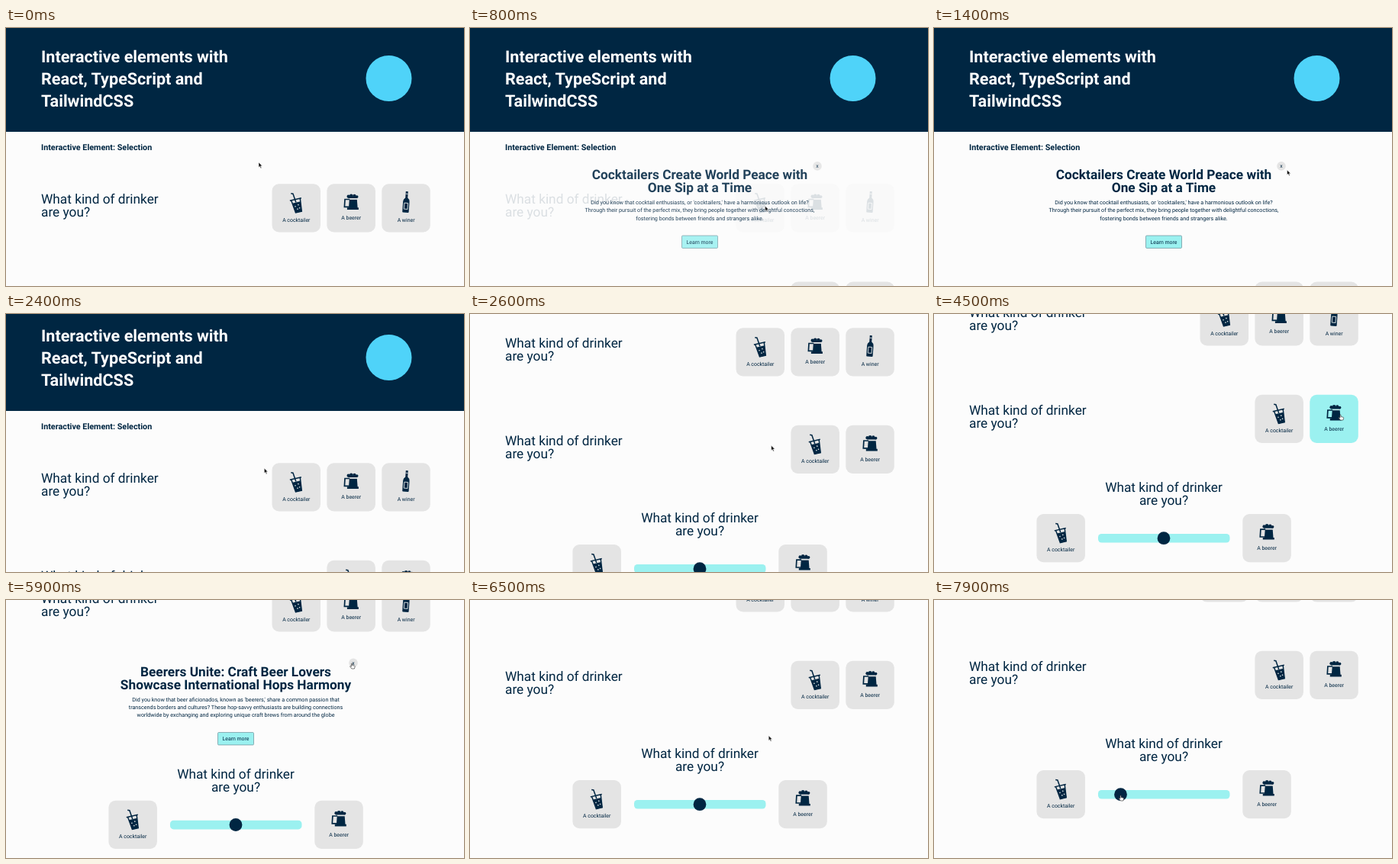
Animation, 600 px wide and 338 px high, one loop 8 s. Source, as an HTML page:

```html
<!DOCTYPE html>
<html lang="en">
<head>
<meta charset="utf-8">
<style>
  html, body { margin: 0; height: 100%; overflow: hidden; background: #fcfcfc; }
  svg { display: block; width: 100vw; height: 100vh; font-family: Roboto, sans-serif; fill: #002642; }
  text { text-rendering: geometricPrecision; }
  .title { font-weight: bold; font-size: 21.6px; fill: #fff; }
  .section { font-weight: bold; font-size: 10.8px; }
  .question { font-size: 17.28px; }
  .headline { font-weight: bold; font-size: 17.28px; }
  .copy { font-size: 7.2px; }
  .label { font-size: 6.92px; }
  .mid { text-anchor: middle; }
  .card { fill: #e4e4e4; }
  .aqua { fill: #9bf1f0; }
  .line { fill: none; stroke: #002642; }
</style>
</head>
<body>
<svg id="stage" viewBox="0 0 600 338"></svg>
<script>
const LOOP = 8000, PITCH = 127.5, ROW_TOP = 204.3;

// Text block: one <text> per line
const lines = (cls, x, y, step, ...rows) =>
  rows.map((s, i) => `<text class="${cls}" x="${x}" y="${y + i * step}">${s}</text>`).join('');

const icons = {
  cocktailer: `<g transform="rotate(-13 32 25)">
      <path class="line" stroke-width="1.5" d="M24.3 20H39.7M26.2 20.5 28.2 37H36.2L38 20.5M27.8 11.2 30.3 12.2 31.6 24"/>
      <path d="M26.7 24.3H37.6L36.3 37.3H28.2Z"/>
      ${[[29.6, 29], [33.8, 27.8], [31.6, 33], [34.6, 32.2]]
        .map(([x, y]) => `<circle cx="${x}" cy="${y}" r=".8" fill="#e4e4e4"/>`).join('')}
    </g>`,
  beerer: `<path class="line" stroke-width="1.7" d="M30 20.2H23.6L23 30H28.8"/>
    <path d="M29.4 20.4H39.4L40.2 31H41.5V33.6H26.5V31H28.6Z"/>
    <circle cx="28.2" cy="16.4" r="2.1"/><circle cx="31.8" cy="15.3" r="2.2"/>
    <circle cx="36" cy="15.6" r="2.2"/><circle cx="39.2" cy="16.8" r="1.9"/>
    <path d="M28 16H39.5V18.7H28Z"/>
    <path fill="none" stroke="#e4e4e4" stroke-width=".8" d="M29.8 19.6H39.5"/>`,
  winer: `<g transform="rotate(4 32 24)">
    <path d="M30.5 9.7H33.5V18.2Q36.2 20 36.2 23V36.5Q36.2 37.5 35.2 37.5H28.8Q27.8 37.5 27.8 36.5V23Q27.8 20 30.5 18.2Z"/>
    <path fill="none" stroke="#e4e4e4" stroke-width=".9" d="M29.6 25H34.4V33H29.6ZM30.4 13H33.6"/></g>`
};
const labelY = { cocktailer: 49.3, beerer: 47, winer: 49.8 };

const card = (kind, x, y) => `<g transform="translate(${x} ${y})">
  <rect class="card" data-x="${x}" data-y="${y}" width="63.5" height="63.2" rx="9"/>
  ${icons[kind]}${lines('label mid', 31.8, labelY[kind], 0, 'A ' + kind)}</g>`;

const question = (cls, x, y) => lines('question ' + cls, x, y, 17.3, 'What kind of drinker', 'are you?');

const row = (id, y, kinds) => `<g id="${id}">${question('', 46, y + 25.8)}${
  kinds.map((k, i) => card(k, 492.3 - 71.9 * (kinds.length - 1 - i), y)).join('')}</g>`;

const panel = (id, y, head, copy) => `<g id="${id}" transform="translate(0 ${y})">
  <circle class="card" cx="455" cy="-23.4" r="5.8"/>${lines('label mid', 455, -21.3, 0, 'x')}
  ${lines('headline mid', 301, -6.3, 17.3, ...head)}
  ${lines('copy mid', 301, 27.1, 10.1, ...copy)}
  <rect class="aqua" x="277.5" y="67.7" width="47" height="16.4" rx="1.2" stroke="#6b8f99" stroke-width=".7"/>
  ${lines('label mid', 301, 78.4, 0, 'Learn more')}</g>`;

const cocktailHead = ['Cocktailers Create World Peace with', 'One Sip at a Time'];
const cocktailCopy = [
  "Did you know that cocktail enthusiasts, or 'cocktailers,' have a harmonious outlook on life?",
  'Through their pursuit of the perfect mix, they bring people together with delightful concoctions,',
  'fostering bonds between friends and strangers alike.'];
const beerHead = ['Beerers Unite: Craft Beer Lovers', 'Showcase International Hops Harmony'];
const beerCopy = [
  "Did you know that beer aficionados, known as 'beerers,' share a common passion that",
  'transcends borders and cultures? These hop-savvy enthusiasts are building connections',
  'worldwide by exchanging and exploring unique craft brews from around the globe'];

const $ = id => document.getElementById(id);
$('stage').innerHTML = `<g id="page">
  <rect width="600" height="136"/>
  ${lines('title', 46, 45, 29, 'Interactive elements with', 'React, TypeScript and', 'TailwindCSS')}
  <circle cx="501.5" cy="66" r="30" fill="#4fd3f9"/>
  ${lines('section', 46, 160.4, 0, 'Interactive Element: Selection')}
  ${row('row1', ROW_TOP, ['cocktailer', 'beerer', 'winer'])}
  ${panel('panel1', ROW_TOP, cocktailHead, cocktailCopy)}
  <g id="second">
    ${row('row2', ROW_TOP + PITCH, ['cocktailer', 'beerer'])}
    ${panel('panel2', ROW_TOP + PITCH, cocktailHead, cocktailCopy)}
    ${panel('panel3', ROW_TOP + PITCH, beerHead, beerCopy)}
  </g>
  <g id="slider">
    ${question('mid', 301, 459)}
    ${card('cocktailer', 134.4, 488)}${card('beerer', 404.3, 488)}
    <rect class="aqua" x="215" y="514" width="172.5" height="11.6" rx="4.5"/>
    <circle id="knob" cy="519.7" r="8.4"/>
  </g></g>
  <g id="cursor">
    <path id="arrow" fill="#111" stroke="#fff" stroke-width=".4" transform="scale(1.25)" d="M0 0V5.2L1.2 4.1 2.1 6.1 3 5.7 2.1 3.8H3.8Z"/>
    <path id="hand" fill="#fff" stroke="#222" stroke-width=".6" d="M-.6 .4Q0-.4 .6 .4V2.6L3.6 3.2Q4.3 3.5 4.1 4.6L3.4 7H-.2L-2.3 4.2Q-2.4 3.3-1.5 3.6L-.6 4.3Z"/>
  </g>`;

const ramp = (t, start, length) => Math.min(1, Math.max(0, (t - start) / length));
const smooth = u => u * u * (3 - 2 * u);
const cubic = u => u < .5 ? 4 * u ** 3 : 1 - 4 * (1 - u) ** 3;
const during = (t, from, to) => ramp(t, from, 220) - ramp(t, to, 220);

// Pointer stops: time, x, y
const path = [
  [0, 331, 176], [60, 331, 176], [500, 382, 236], [700, 382, 236], [1400, 462.5, 186],
  [1520, 455, 181], [1700, 455, 181], [2350, 338.3, 202], [2420, 338.3, 202], [2780, 450, 143],
  [2900, 450, 143], [3200, 445.3, 149.5], [3500, 454, 83], [3700, 454, 83], [4300, 532.5, 132],
  [4900, 532.5, 132], [5700, 453, 83], [6050, 453, 83], [6400, 400, 170],
  [6950, 301, 256], [7100, 301, 256], [7750, 244.5, 256], [8000, 244.5, 256]];

function pointer(t) {
  const i = path.findIndex(p => p[0] > t), [a, x0, y0] = path[i - 1], [b, x1, y1] = path[i];
  const u = smooth((t - a) / (b - a));
  return [x0 + (x1 - x0) * u, y0 + (y1 - y0) * u];
}

function show(id, opacity) { $(id).setAttribute('opacity', opacity); }
function move(id, x, y) { $(id).setAttribute('transform', `translate(${x} ${y})`); }

function draw(t) {
  const scroll = Math.round(226 * cubic(ramp(t, 2300, 465)) + 39 * cubic(ramp(t, 6250, 450)));
  const open1 = during(t, 610, 1600), open2 = during(t, 2900, 3600), open3 = during(t, 4700, 5930);
  const [x, y] = pointer(t);
  const knobX = 301 - 56.5 * smooth(ramp(t, 7100, 650));

  show('panel1', open1);
  show('panel2', open2);
  show('panel3', open3);
  show('row1', 1 - open1);
  show('row2', (1 - open2 - open3) * ramp(t, 60, 300));
  move('second', 0, .8 * open1);
  move('slider', 0, .8 * (open2 + open3));
  move('page', 0, -scroll);
  $('knob').setAttribute('cx', knobX);

  let pointing = Math.hypot(x - knobX, y + scroll - 519.7) < 8.4;
  for (const [open, top] of [[open1, ROW_TOP], [open2 + open3, ROW_TOP + PITCH]])
    pointing ||= open > .5 && Math.hypot(x - 455, y + scroll - top + 23.4) < 5.8;
  for (const box of document.querySelectorAll('rect.card')) {
    const dx = x - box.dataset.x, dy = y + scroll - box.dataset.y;
    const hidden = box.closest('#row1') ? open1 : box.closest('#row2') ? open2 + open3 : 0;
    const hover = dx > 0 && dx < 63.5 && dy > 0 && dy < 63.2 && hidden < .5;
    box.style.fill = hover ? '#9bf1f0' : '';
    pointing ||= hover;
  }
  move('cursor', x, y);
  show('hand', +pointing);
  show('arrow', +!pointing);
}

function tick() {
  draw(performance.now() % LOOP);
  requestAnimationFrame(tick);
}
tick();
</script>
</body>
</html>
```
